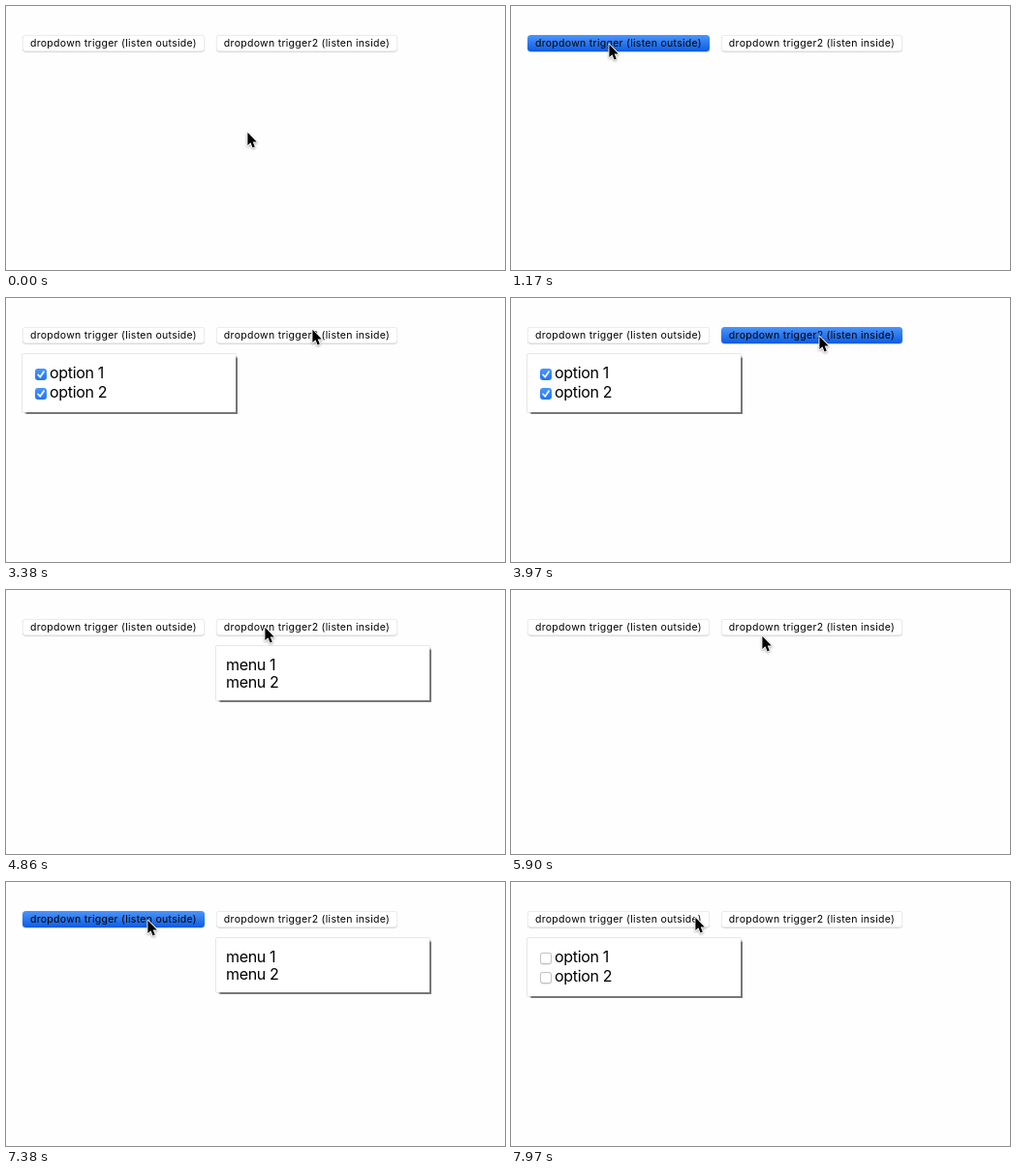
These frames come from a looping animation (515 px wide and 273 px high, 8 s). An HTML page:

```html
<!DOCTYPE html>
<html lang="en">
<head>
<meta charset="utf-8">
<title>Dropdown demo</title>
<style>
  html, body { margin: 0; width: 100%; height: 100%; overflow: hidden; background: #fefefe; }
  body { position: relative; color: #000; font: 16px Inter, "Open Sans", sans-serif; }
  body > * { position: absolute; box-sizing: border-box; white-space: nowrap; }

  .trigger {
    top: 30px; height: 17px;
    border-radius: 3.5px; background: #fff;
    box-shadow: inset 0 0 0 .5px #dcdcdc, 0 .5px .8px #bbb;
    font-size: 10.5px; line-height: 18px; letter-spacing: .29px; text-align: center;
  }
  .trigger.on {
    background: linear-gradient(#4a95fb, #0e5ce2);
    box-shadow: 0 .5px .8px #7a9fdc;
  }
  #first { left: 17px; width: 188px; }
  #second { left: 217px; width: 187px; }

  .panel {
    top: 58px; width: 220px; padding: 10px;
    background: #fff; letter-spacing: -.33px;
    box-shadow: 1.5px 1.5px 1px #777, 0 0 1px #777;
    visibility: hidden;
  }
  .panel.on { visibility: visible; }
  #options { left: 17px; }
  #menu { left: 217px; }
  .option { position: relative; height: 20px; padding-left: 18px; line-height: 19px; }
  .item { height: 18px; line-height: 18px; }

  .box {
    position: absolute; left: 3px; top: 5px; width: 12px; height: 12px;
    border-radius: 3px; background: #fff;
    box-shadow: inset 0 0 0 1px #c2c2c2, 0 .5px .5px #ccc;
  }
  .box path { fill: none; stroke-width: 1.7; stroke-linecap: round; stroke-linejoin: round; }
  .box.on { background: linear-gradient(#4a97fb, #2274f2); box-shadow: none; }
  .box.on path { stroke: #fff; }

  #cursor {
    left: 0; top: 0; width: 14px; height: 21px; overflow: visible;
    filter: drop-shadow(0 1px .8px rgba(0, 0, 0, .35));
  }
  #cursor path { stroke: #fff; stroke-width: 1.8; stroke-linejoin: round; paint-order: stroke; }
</style>
</head>
<body>
  <div id="first" class="trigger">dropdown trigger (listen outside)</div>
  <div id="second" class="trigger">dropdown trigger2 (listen inside)</div>

  <div id="options" class="panel">
    <div class="option"><svg id="check1" class="box" viewBox="0 0 12 12"><path d="M3 6.3 5.2 8.8 9 3.2"/></svg>option 1</div>
    <div class="option"><svg id="check2" class="box" viewBox="0 0 12 12"><path d="M3 6.3 5.2 8.8 9 3.2"/></svg>option 2</div>
  </div>

  <div id="menu" class="panel">
    <div class="item">menu 1</div>
    <div class="item">menu 2</div>
  </div>

  <svg id="cursor" viewBox="0 0 14 21"><path d="M1.4 1.8V15L4.4 12.3 6.6 17.4 8.8 16.5 6.7 11.5H10.8Z"/></svg>

<script>
  const LOOP = 8000, LEAD = 280, BEAT = 147.6; // the screen refreshes once per beat

  // What is clicked, and on which beat the button is released
  const clicks = [
    [7, 'first'], [13, 'check1'], [16, 'check2'], [26, 'second'],
    [35, 'item'], [42, 'second'], [49, 'first']
  ];

  // Pointer moves: leaving beat, arriving beat, x, y
  const home = [248, 129];
  const moves = [
    [-1, 5, 100, 38], [8, 11, 35, 79], [13, 15, 35, 96],
    [16, 20, 280, 13], [20, 21, 315, 31], [21, 23, 317, 38],
    [27, 31, 266, 37], [31, 34, 255, 75], [36, 38, 258, 46],
    [38, 39, 262, 38], [43, 45, 159, 50], [45, 47, 145, 38], [50, 52, 189, 35]
  ];

  const byId = id => document.getElementById(id);
  const light = (id, on) => byId(id).classList.toggle('on', on);
  const ease = u => u * u * (3 - 2 * u);

  function pointer(beat) {
    let [x, y] = home;
    for (const [leave, arrive, toX, toY] of moves) {
      const u = ease(Math.min(1, Math.max(0, (beat - leave) / (arrive - leave))));
      x += (toX - x) * u;
      y += (toY - y) * u;
    }
    return [x, y].map(Math.round);
  }

  function draw() {
    const now = performance.now() % LOOP;
    const beat = Math.floor((now - LEAD) / BEAT);
    const [x, y] = pointer(beat);
    byId('cursor').style.transform = `translate(${x}px, ${y}px)`;

    // A trigger opens its own panel afresh; clicking an item closes the menu
    let open = '', ticked = [];
    for (const [at, id] of clicks) {
      if (at > beat) break;
      if (id.startsWith('check')) ticked.push(id);
      else { open = id; ticked = []; }
    }
    const pressed = clicks.find(([at]) => at === beat + 1)?.[1];

    for (const id of ['first', 'second']) light(id, pressed === id);
    for (const id of ['check1', 'check2']) light(id, ticked.includes(id));
    light('options', open === 'first');
    light('menu', open === 'second');
    requestAnimationFrame(draw);
  }
  draw();
</script>
</body>
</html>
```
